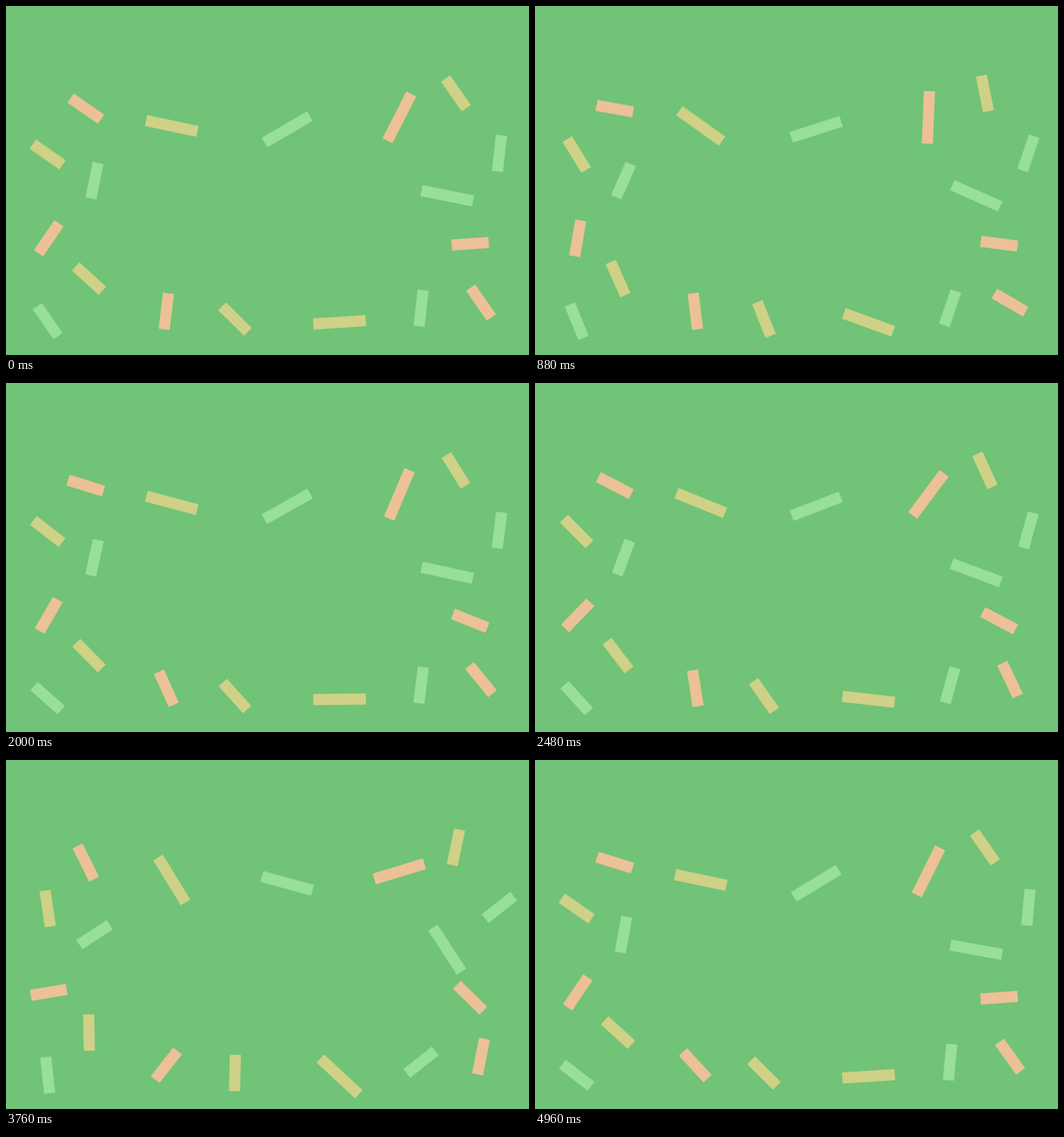
Write an HTML page without scripts that moves like this. It is 916 px wide and 611 px high and loops after 5000 ms.

```html
<!DOCTYPE html>
<html lang="en">
<head>
<meta charset="utf-8">
<title>Confetti</title>
<style>
  html, body { margin: 0; width: 100%; height: 100%; overflow: hidden; background: #70c377; }
  svg { display: block; width: 916px; height: 611px; }

  .bar { x: -31.75px; y: -9.75px; width: 63.5px; height: 19.5px; animation: 5s linear infinite; }
  .long { x: -46px; width: 92px; }
  .wide { x: -32.5px; width: 65px; }

  .mint { fill: #97df9b; }
  .sand { fill: #cfd187; }
  .peach { fill: #edc197; }

  /* Each group swings around its resting angle */
  .mint .bar { animation-name: mint; }
  .sand .bar { animation-name: sand; }
  .peach .bar { animation-name: peach; }
  .mint .sink { animation-name: mint-sink; }
  .peach .sink { animation-name: peach-sink; }
  .peach .climb { animation-name: climb; }
  .peach .whip { animation-name: whip; }

  @keyframes mint {
    0% { transform: rotate(0deg); }
    22.4% { transform: rotate(15.8deg); }
    42.4% { transform: rotate(-1.1deg); }
    77.6% { transform: rotate(48.9deg); }
    99.2%, 100% { transform: rotate(-1.1deg); }
  }
  @keyframes mint-sink {
    0% { transform: rotate(0deg); }
    22.4% { transform: rotate(15.8deg); }
    42.4% { transform: rotate(-17.5deg); }
    77.6% { transform: rotate(32deg); }
    99.2%, 100% { transform: rotate(-17.5deg); }
  }
  @keyframes sand {
    0% { transform: rotate(0deg); }
    20.8% { transform: rotate(28deg); }
    42.4% { transform: rotate(0deg); }
    77.6% { transform: rotate(50deg); }
    99.2%, 100% { transform: rotate(0deg); }
  }
  @keyframes peach {
    0% { transform: rotate(0deg); }
    22.4% { transform: rotate(-31.5deg); }
    42.4% { transform: rotate(-.6deg); }
    77.6% { transform: rotate(49.4deg); }
    99.2%, 100% { transform: rotate(-.6deg); }
  }
  @keyframes peach-sink {
    0% { transform: rotate(0deg); }
    22.4% { transform: rotate(-31.5deg); }
    31.6%, 42.4% { transform: rotate(-17.6deg); }
    77.6% { transform: rotate(32.2deg); }
    99.2%, 100% { transform: rotate(-17.6deg); }
  }
  @keyframes climb {
    0% { transform: rotate(0deg); }
    77.6% { transform: rotate(50deg); }
    99.2%, 100% { transform: rotate(0deg); }
  }
  @keyframes whip {
    0% { transform: rotate(0deg); }
    40.8% { transform: rotate(-31.8deg); }
    81.6% { transform: rotate(43deg); }
    99.2%, 100% { transform: rotate(-49.5deg); }
  }
</style>
</head>
<body>
<svg viewBox="0 0 916 611">
  <path d="M0 .5H916M.5 0V611" stroke="#82bd88" fill="none"/>

  <g class="mint">
    <g transform="translate(155 305.8) rotate(101.3)"><rect class="bar"/></g>
    <g transform="translate(492.5 215.9) rotate(-30.2)"><rect class="bar long"/></g>
    <g transform="translate(864.2 258) rotate(96.3)"><rect class="bar"/></g>
    <g transform="translate(772.8 332.2) rotate(11.4)"><rect class="bar long"/></g>
    <g transform="translate(727 529) rotate(96.3)"><rect class="bar"/></g>
    <g transform="translate(73 551.8) rotate(55.1)"><rect class="bar sink"/></g>
  </g>

  <g class="sand">
    <g transform="translate(788 153) rotate(55.1)"><rect class="bar"/></g>
    <g transform="translate(290.3 210) rotate(11.8)"><rect class="bar long"/></g>
    <g transform="translate(73 260) rotate(34.9)"><rect class="bar"/></g>
    <g transform="translate(145.4 477.2) rotate(42.3)"><rect class="bar"/></g>
    <g transform="translate(401 548) rotate(44.7)"><rect class="bar"/></g>
    <g transform="translate(584.2 553.8) rotate(-3.8)"><rect class="bar long"/></g>
  </g>

  <g class="peach">
    <g transform="translate(139.8 179.7) rotate(34.9)"><rect class="bar wide sink"/></g>
    <g transform="translate(689 195) rotate(117.1)"><rect class="bar long"/></g>
    <g transform="translate(74.8 406.8) rotate(124.5)"><rect class="bar"/></g>
    <g transform="translate(812.9 416.2) rotate(-4)"><rect class="bar wide climb"/></g>
    <g transform="translate(832 519.3) rotate(55)"><rect class="bar"/></g>
    <g transform="translate(280.8 534.5) rotate(96.8)"><rect class="bar whip"/></g>
  </g>
</svg>
</body>
</html>
```
